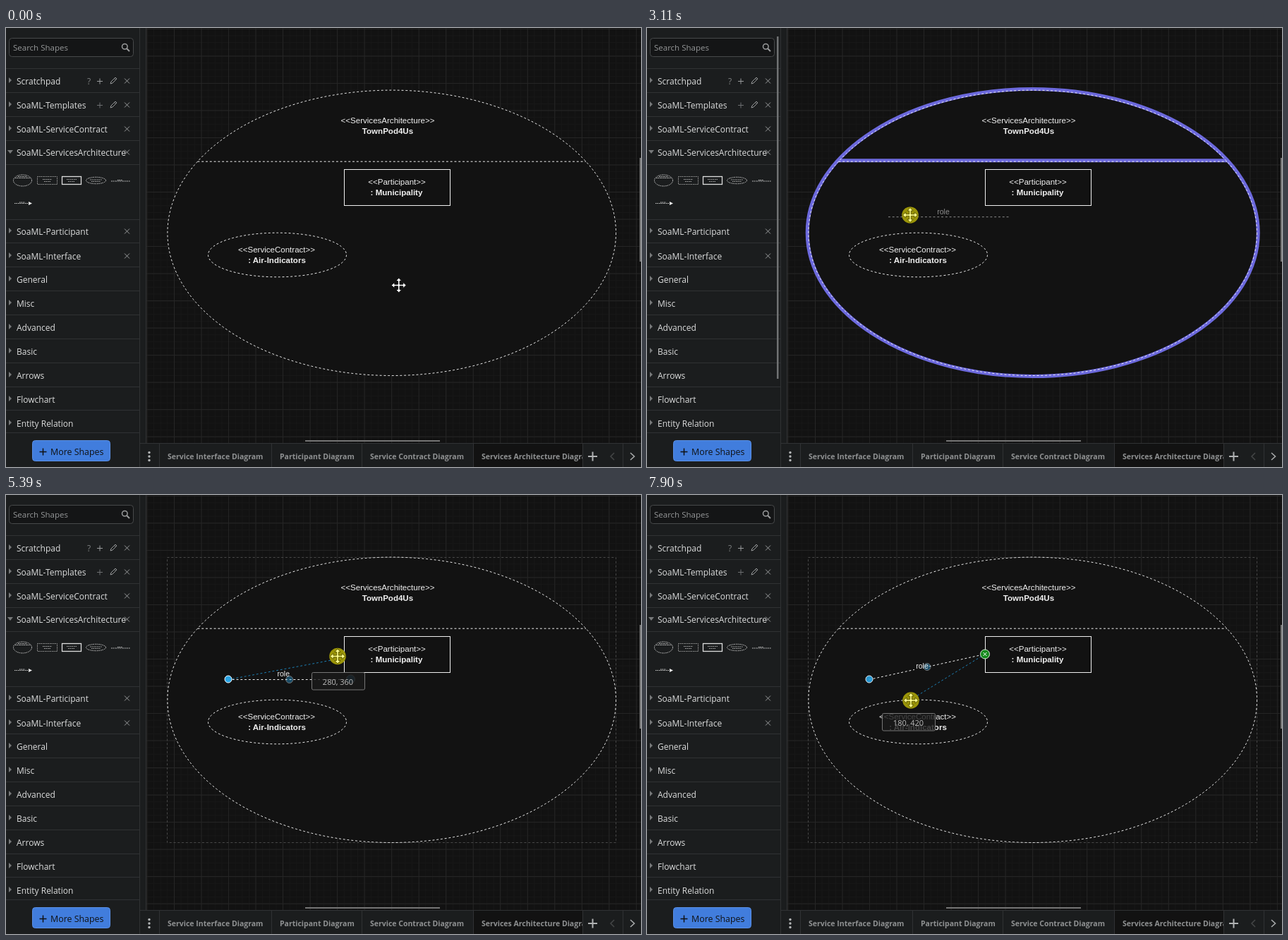
An HTML page that plays this animation: 900 by 622 pixels, repeating every 7.99 s.

```html
<!DOCTYPE html>
<html lang="en">
<head>
<meta charset="utf-8">
<title>Diagram editor</title>
<style>
  html, body { margin: 0; width: 100%; height: 100%; overflow: hidden; background: #121212; }
  svg { display: block; width: 900px; height: 622px; }
  .ui { font: 12px "Open Sans", sans-serif; fill: #dcdddd; }
  .tab { font: bold 10.5px "Open Sans", sans-serif; fill: #8f9192; }
  .shape { font: 11.56px "Liberation Sans", Arial, sans-serif; fill: #f0f0f0; text-anchor: middle; }
  .bold { font-weight: bold; }
  .role { font: 10.5px "Liberation Sans", Arial, sans-serif; text-anchor: middle; }
  .dash { stroke-dasharray: 2.889 2.889; }
</style>
</head>
<body>
<svg id="stage" viewBox="0 0 900 622"></svg>
<script>
const NS = "http://www.w3.org/2000/svg";
const stage = document.getElementById("stage");

function add(parent, tag, attrs = {}, text) {
  const node = document.createElementNS(NS, tag);
  set(node, attrs);
  if (text !== undefined) node.textContent = text;
  parent.appendChild(node);
  return node;
}
function set(node, attrs) {
  for (const key in attrs) node.setAttribute(key, attrs[key]);
}
const group = (parent = stage) => add(parent, "g");
const rect = (p, x, y, width, height, fill, more) => add(p, "rect", { x, y, width, height, fill, ...more });
const path = (p, d, stroke, more) => add(p, "path", { d, stroke, fill: "none", ...more });
const label = (p, x, y, text, cls, more) => add(p, "text", { x, y, class: cls, ...more }, text);
const oval = (p, cx, cy, rx, ry, stroke, more) => add(p, "ellipse", { cx, cy, rx, ry, stroke, fill: "none", ...more });
const show = (node, on) => { node.style.display = on ? "" : "none"; };

const PAPER = "#121212", PANEL = "#1b1d1e", RULE = "#303234", INK = "#f0f0f0";
const BLUE = "#29a5e6", VIOLET = "#6c69dd", ICON = "#999b9c";
const CELL = 9.63, SNAP_X = 469.6, SNAP_Y = 232.5;

// Canvas and grid
rect(stage, 0, 0, 900, 622, PAPER);
function gridLines(step, color) {
  let d = "";
  for (let x = 238.5 - Math.floor(39 / step) * step; x < 900; x += step) d += `M${x} 0V588`;
  for (let y = SNAP_Y - Math.floor(SNAP_Y / step) * step; y < 588; y += step) d += `M199 ${y}H900`;
  path(stage, d, color);
}
gridLines(CELL, "#181818");
gridLines(CELL * 4, "#262626");

// Diagram
const diagram = group();
oval(diagram, 546.7, 290.3, 317.8, 202.2, "none", { fill: PAPER });
const bounds = path(diagram, "M228.5 88.5H864.5V492.5H228.5Z", "#484848", { class: "dash" });
const glow = group(diagram);
oval(glow, 546.7, 290, 319.5, 203.5, VIOLET, { "stroke-width": 5 });
path(glow, "M270 187.8H824", VIOLET, { "stroke-width": 5 });
oval(diagram, 546.7, 290.3, 317.8, 202.2, INK, { class: "dash" });
path(diagram, "M271.5 189.2H821.9", INK, { class: "dash" });
label(diagram, 541, 135, "<<ServicesArchitecture>>", "shape");
label(diagram, 541, 150, "TownPod4Us", "shape bold");
rect(diagram, 479.5, 200.5, 150, 51, PAPER, { stroke: INK });
label(diagram, 554, 222, "<<Participant>>", "shape");
label(diagram, 553.5, 237, ": Municipality", "shape bold");
oval(diagram, 384.5, 321.5, 98, 31.3, INK, { class: "dash", fill: PAPER });
label(diagram, 383.5, 318, "<<ServiceContract>>", "shape");
label(diagram, 384, 333, ": Air-Indicators", "shape bold");

// Connector being dropped
const ghost = group();
path(ghost, "M0 0H172", "#8c8c8c", { class: "dash" });
label(ghost, 78, -4, "role", "role", { fill: "#8c8c8c" });

// Placed connector
const edge = group();
const wire = path(edge, "", INK, { class: "dash" });
const patch = rect(edge, 0, 0, 20, 11, PAPER);
const rubber = path(edge, "", "#1d7fb3", { class: "dash" });
const knob = (r, more) => add(edge, "circle", { r, fill: BLUE, stroke: "#fff", ...more });
const midKnob = knob(5, { opacity: 0.4 });
const startKnob = knob(5, { cx: 315, cy: 261 });
const endKnob = knob(6, { cx: 488.5, cy: 261 });
const edgeText = label(edge, 0, 0, "role", "role", { fill: INK });
const ports = group(edge);
const cross = (p, x, y, color) =>
  path(p, `M${x - 2.5} ${y - 2.5}l5 5m0 -5l-5 5`, color);
for (const f of [0, 0.25, 0.5, 0.75, 1])
  for (const g of [0, 0.25, 0.5, 0.75, 1])
    if (f % 1 === 0 || g % 1 === 0) cross(ports, 479.5 + f * 150, 200.5 + g * 51, BLUE);
const joint = group(edge);
add(joint, "circle", { cx: 479, cy: 225.5, r: 6.5, fill: "#158a1c", stroke: "#d5efd5" });
cross(joint, 479, 225.5, "#fff");

const hint = group();
rect(hint, 0.5, 0.5, 75, 24.5, "#1a1a1a", { stroke: "#777", rx: 2, "fill-opacity": 0.8 });
const hintText = label(hint, 37.5, 17.5, "", "ui", { "text-anchor": "middle", style: "font-size:11px;fill:#bdbdbd" });

// Canvas scroll bars
rect(stage, 424, 584, 191, 2, "#757575");
rect(stage, 898, 184, 2, 147, "#757575");

// Sidebar
rect(stage, 0, 0, 199, 622, PANEL);
const splitter = rect(stage, 189, 0, 10, 588, "#36383a");
path(stage, "M189.5 0V622M198.5 0V588", RULE);
rect(stage, 4.5, 14.5, 176, 26, "#141516", { rx: 4, stroke: "#47494a" });
label(stage, 10, 32, "Search Shapes", "ui", { style: "font-size:11.5px;fill:#959798" });
path(stage, "M171 29L175 33", ICON, { "stroke-width": 2 });
add(stage, "circle", { cx: 168.3, cy: 26.3, r: 3.8, fill: "none", stroke: ICON, "stroke-width": 1.5 });
path(stage, [57, 91, 125, 159, 193, 271, 304, 338, 372, 406, 440, 474, 508, 541, 573]
  .map(y => `M0 ${y}.5H189`).join(""), RULE);

// Each section: title, centre line, number of tool icons
[["Scratchpad", 75, 4], ["SoaML-Templates", 109, 3], ["SoaML-ServiceContract", 143, 1],
 ["SoaML-ServicesArchitecture", 176, 1], ["SoaML-Participant", 288, 1], ["SoaML-Interface", 323, 1],
 ["General", 356, 0], ["Misc", 390, 0], ["Advanced", 424, 0], ["Basic", 458, 0],
 ["Arrows", 492, 0], ["Flowchart", 526, 0], ["Entity Relation", 560, 0]].forEach(([title, y, tools]) => {
  label(stage, 15, y + 4.5, title, "ui");
  add(stage, "path", {
    d: y === 176 ? `M2 ${y - 3}h8l-4 5z` : `M4 ${y - 5}v8l4 -4z`, fill: "#77797a"
  });
  if (tools > 0) path(stage, `M168 ${y - 3.5}l7 7m0 -7l-7 7`, ICON);
  if (tools > 1) {
    path(stage, `M148 ${y + 4}l1 -3 6 -6 2 2 -6 6zM153.5 ${y - 3.5}l2 2`, ICON);
    path(stage, `M129 ${y + 0.5}h8m-4 -4v8`, tools > 3 ? ICON : "#6d6f70");
  }
  if (tools > 3) label(stage, 115, y + 4.5, "?", "ui", { style: "fill:#7c7e7f" });
});

const tile = rect(stage, 145, 200, 34, 32, "#343637", { rx: 7 });
const icons = group();
const tiny = { "stroke-dasharray": "1.5 1" };
oval(icons, 23.5, 216, 13, 8, "#ccc", tiny);
path(icons, "M13 212.5H34M17 210.5h13", "#ccc", tiny);
rect(icons, 44.5, 210.5, 28, 11, "none", { stroke: "#999", ...tiny });
path(icons, "M52 214.5h13M54 217.5h9M86 214.5h14M88 217.5h10M119 215h17M121 217.5h13", "#aaa", tiny);
rect(icons, 79.5, 210.5, 27, 11, "none", { stroke: "#ddd", "stroke-width": 1.3 });
oval(icons, 127.5, 216, 14, 4.7, "#ccc", tiny);
path(icons, "M149 217H176M158 215.5h7M12 248.5H34M19 247h8", "#ccc", tiny);
add(icons, "path", { d: "M32 246l5 2.5 -5 2.5z", fill: "#eee" });

const sideBar = rect(stage, 184, 12, 2.5, 485, "#707273");
rect(stage, 37.5, 584.5, 110, 29, "#417ddd", { rx: 4, stroke: "#5a8fe4" });
path(stage, "M47.5 600.5h10m-5 -5v10", "#101214", { "stroke-width": 1.5 });
label(stage, 63, 604.5, "More Shapes", "ui", { style: "font-size:12.4px;fill:#101214" });

// Page tabs
rect(stage, 190, 588, 710, 34, PANEL);
rect(stage, 663, 588, 154, 34, PAPER);
[["Service Interface Diagram", 229], ["Participant Diagram", 388], ["Service Contract Diagram", 516],
 ["Services Architecture Diagram", 674]].forEach(([title, x]) => label(stage, x, 611.3, title, "tab"));
rect(stage, 817, 588, 83, 34, PANEL);
path(stage, "M190 588.5H900M217.5 588V622M376.5 588V622M504.5 588V622M662.5 588V622M817.5 588V622M874.5 588V622", RULE);
for (const y of [601.5, 607, 612.5]) add(stage, "circle", { cx: 203, cy: y, r: 1.7, fill: "#b4b6b7" });
path(stage, "M825 607h13m-6.5 -6.5v13", "#b0b2b3", { "stroke-width": 2 });
path(stage, "M862 602l-5 5 5 5", "#444647", { "stroke-width": 1.5 });
path(stage, "M885 602l5.5 5 -5.5 5", "#a8aaab", { "stroke-width": 1.6 });

// Hover preview of the palette entry
const preview = group();
rect(preview, 199.5, 192.5, 205, 82, PANEL, { rx: 4, stroke: "#3c3e40" });
path(preview, "M216 238.5H389", INK, { class: "dash" });
label(preview, 294, 234, "role", "role", { fill: INK });

// Pointers
const pointer = group();
const press = add(pointer, "circle", { r: 11.8, fill: "#a29c08", opacity: 0.95 });
const outline = { stroke: "#111", "stroke-width": 1, "stroke-linejoin": "round" };
const shapes = {
  arrow: "M0 0V16L3.8 12.4L6.3 18L8.8 17L6.3 11.4H11Z",
  hand: "M-2 1.5C-2 -.5 1.2 -.5 1.2 1.5V7.5L9 9Q11.5 9.5 11.5 12L11 16L8.5 21.5H-.5L-5 13.5Q-5.3 10.8 -3.5 11.3L-2 13Z",
  move: "M0 -10.5L4.2 -6H1.3V-1.3H6V-4.2L10.5 0L6 4.2V1.3H1.3V6H4.2L0 10.5L-4.2 6H-1.3V1.3H-6V4.2L-10.5 0L-6 -4.2V-1.3H-1.3V-6H-4.2Z",
  resize: "M-10 0L-5.5 -4V-1H-2V-8H-.5V8H-2V1H-5.5V4ZM10 0L5.5 -4V-1H2V-8H.5V8H2V1H5.5V4Z"
};
const looks = {};
for (const kind in shapes) looks[kind] = add(pointer, "path", { d: shapes[kind], ...outline });

// Pointer moves: first change, last change, steps, then [progress, x, y] stops
const moves = [
  [200, 990, 11, [[0, 556.7, 364.5], [1, 190, 236]]],
  [1070, 1310, 4, [[0, 190, 236], [1, 169, 231.5]]],
  [1470, 1630, 3, [[0, 169, 231.5], [1, 170, 232]]],
  [2320, 3110, 11, [[0, 170, 232], [4 / 11, 308, 268.5], [1, 373, 265]]],
  [3180, 3500, 5, [[0, 373, 265], [1, 346, 258]]],
  [3660, 4440, 11, [[0, 346, 258], [4 / 11, 325, 262], [1, 478, 261]]],
  [4520, 4680, 3, [[0, 478, 261], [1, 484, 267]]],
  [4840, 4840, 1, [[0, 484, 267], [1, 486, 268]]],
  [4990, 5390, 6, [[0, 486, 268], [0.6, 484, 238], [1, 470, 228.5]]],
  [5620, 5870, 4, [[0, 470, 228.5], [1, 478, 227]]],
  [6170, 6650, 7, [[0, 478, 227], [1 / 7, 478, 229], [1, 282, 273.5]]],
  [6800, 6970, 3, [[0, 282, 273.5], [1, 313, 268]]],
  [7200, 7280, 2, [[0, 313, 268], [1, 313, 265]]],
  [7430, 7900, 7, [[0, 313, 265], [1, 374, 291]]]
];

function progress([from, to, steps], t) {
  if (t < from) return 0;
  if (t >= to) return 1;
  return (Math.floor((t - from) / (to - from) * (steps - 1) + 1e-6) + 1) / steps;
}

function pointerAt(t) {
  const move = moves.filter(m => t >= m[0]).pop() || moves[0];
  const p = progress(move, t), stops = move[3];
  let i = 1;
  while (i < stops.length - 1 && p > stops[i][0] + 1e-6) i++;
  const [pa, xa, ya] = stops[i - 1], [pb, xb, yb] = stops[i];
  const f = (p - pa) / (pb - pa);
  return [xa + (xb - xa) * f, ya + (yb - ya) * f];
}

const near = (x, y, hx, hy) => Math.hypot(x - hx, y - hy) < 14;

function pointerKind(x, y, t, pressed, joined) {
  if (x < 187) return "arrow";
  if (x <= 199) return pressed ? "arrow" : "resize";
  if (pressed) return "move";
  const onKnob = near(x, y, 315, 261) || near(x, y, ...(joined ? [479, 225] : [489, 261]));
  if (t >= 3660 && onKnob) return "hand";
  return x > 232 ? "move" : "arrow";
}

function render(t) {
  const [x, y] = pointerAt(t);
  const dropping = t >= 2320 && t < 3660;
  const dragEnd = t >= 4990 && t < 6170;
  const dragStart = t >= 7430;
  const dragging = dragEnd || dragStart;
  const placed = t >= 3660;
  const joined = t >= 6170;
  const pressed = dropping || dragging;

  // Hover states
  show(splitter, !placed && x >= 189 && x <= 199);
  show(tile, x < 180);
  show(sideBar, t >= 1070 && x < 189 || t >= 1310 && t < 4990);
  show(preview, t >= 1470 && t < 2320);
  preview.setAttribute("opacity", progress(moves[2], t));

  show(ghost, dropping && x > 200);
  ghost.setAttribute("transform", `translate(${x - 31} ${y + 2.7})`);
  show(glow, dropping && x > 235);
  show(bounds, placed);
  show(edge, placed);

  // Connector geometry
  const ex = joined ? 479 : 488.5, ey = joined ? 225.5 : 261.5;
  const mx = (315 + ex) / 2, my = (261.5 + ey) / 2;
  set(wire, {
    d: `M315 261.5L${ex} ${ey}`,
    stroke: dragging ? INK : joined ? "#3a9dcd" : "#929da3"
  });
  set(patch, { x: mx - 18, y: my - 13 + (joined ? 7 : 0) });
  set(edgeText, { x: mx - (joined ? 7 : 8.5), y: my + (joined ? 2.5 : -4.5) });
  set(midKnob, { cx: mx, cy: my });
  show(endKnob, !joined);
  endKnob.setAttribute("opacity", dragEnd ? 0.4 : 1);
  startKnob.setAttribute("opacity", dragStart ? 0.9 : 1);

  // Loose end snaps to the grid, or to a port of the box
  const gx = Math.round((x - SNAP_X) / CELL), gy = Math.round((y - SNAP_Y) / CELL);
  const snapped = dragEnd && t >= 5700;
  const over = dragEnd && x > 479 && y < 252;
  const lx = snapped ? 479 : SNAP_X + gx * CELL, ly = snapped ? 225.5 : SNAP_Y + gy * CELL;
  show(rubber, dragging);
  rubber.setAttribute("d", dragStart ? `M479 225.5L${lx} ${ly}` : `M315 261.5L${lx} ${ly}`);
  show(ports, over || snapped);
  show(joint, joined || snapped);
  show(hint, dragging && !snapped);
  hint.setAttribute("transform", `translate(${433 + gx * 10} ${251 + Math.round(gy * CELL)})`);
  hintText.textContent = `${280 + gx * 10}, ${360 + gy * 10}`;

  // Pointer
  const kind = pointerKind(x, y, t, pressed, joined);
  pointer.setAttribute("transform", `translate(${x} ${y})`);
  show(press, pressed);
  for (const name in looks) {
    show(looks[name], name === kind);
    set(looks[name], { fill: pressed ? "#ffff8c" : "#fff", stroke: pressed ? "#5f5b00" : "#111" });
  }
}

const LOOP = 7990;
const begin = performance.now();
function tick() {
  render((performance.now() - begin) % LOOP);
  requestAnimationFrame(tick);
}
tick();
</script>
</body>
</html>
```
